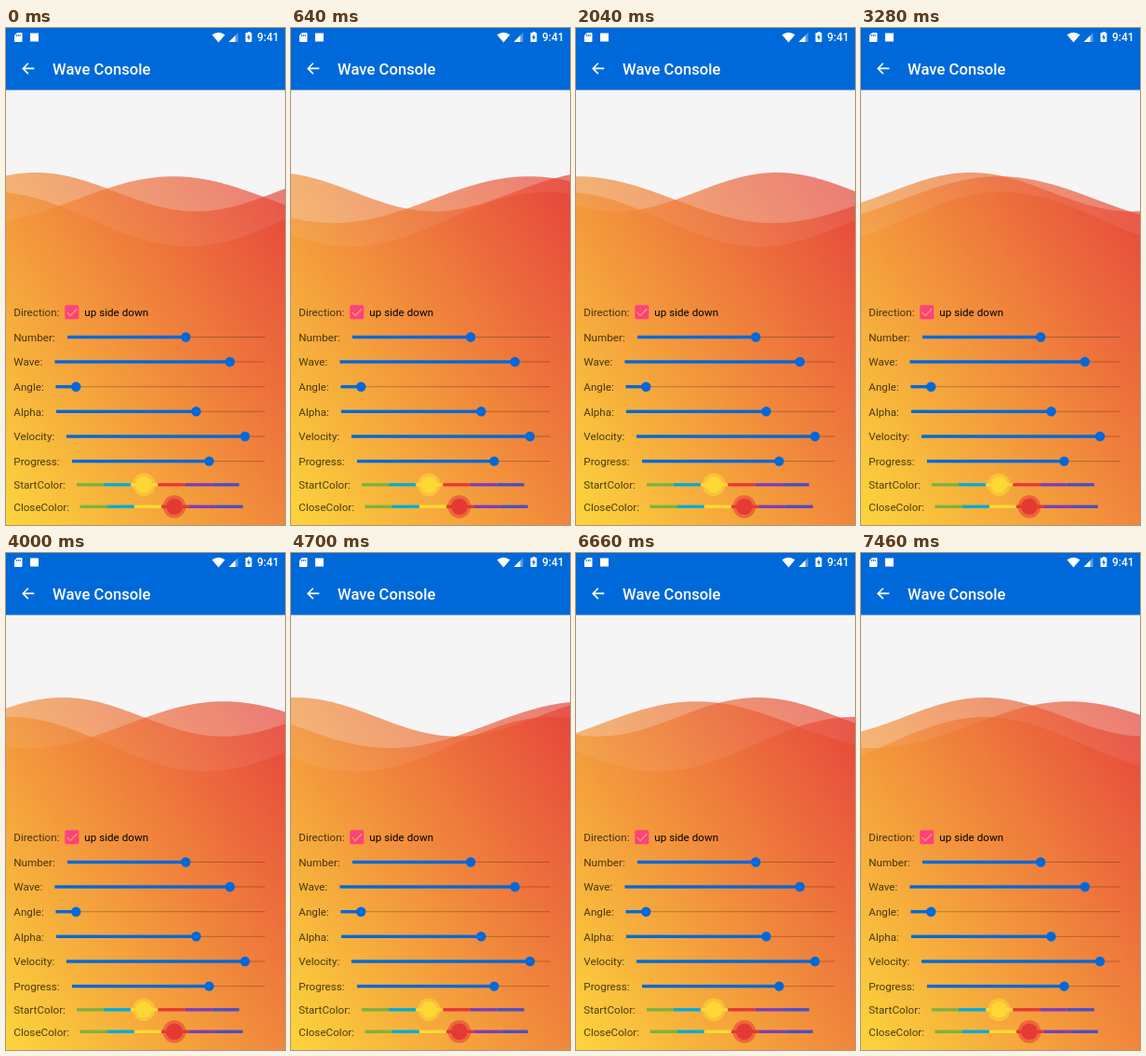
An HTML page with a canvas that plays this animation: 300x533 px, repeating every 7480 ms.

```html
<!DOCTYPE html>
<html lang="en">
<head>
<meta charset="utf-8">
<title>Wave Console</title>
<style>
  html, body { margin: 0; width: 100%; height: 100%; overflow: hidden; background: #f5f5f5; }
  canvas, svg { position: absolute; left: 0; top: 0; width: 300px; height: 533px; display: block; }
  text { font-family: Roboto, "Noto Sans", sans-serif; font-size: 11.67px; }
  .label { fill: rgba(0, 0, 0, .7); }
  .white { fill: #fff; font-weight: 500; }
</style>
</head>
<body>
<canvas id="waves"></canvas>
<svg id="ui" viewBox="0 0 300 533">
  <rect width="300" height="66.5" fill="#0069d9"/>

  <!-- status bar -->
  <path d="M12 5h4.6q.9 0 .9.9v8.2q0 .9-.9.9H9.9q-.9 0-.9-.9V8z" fill="#fff"/>
  <path d="M11.6 7v2M13.4 7v2M15.2 7v2" stroke="#0069d9" stroke-width=".9"/>
  <rect x="26" y="5.5" width="9" height="9" fill="#fff"/>
  <path d="M221.5 7.2q7-5 14 0L228.500 15.500z" fill="#fff"/>
  <path d="M249.500 5v10h-10z" fill="#fff" opacity=".35"/>
  <path d="M246.500 8v7h-7z" fill="#fff"/>
  <path d="M259 5h1V4h2.500v1h1q.8 0 .8.8v8.400q0 .8-.8.800h-5.200q-.8 0-.8-.8V5.800q0-.8.8-.8z" fill="#fff"/>
  <path d="M261.300 6.500L259 10.500h1.600v3l2.400-4.200h-1.700z" fill="#0069d9"/>
  <text class="white" x="270" y="14.300" style="font-size:12px">9:41</text>

  <!-- toolbar -->
  <path d="M30.300 43.400H18.500M23.900 37.700L18.200 43.400L23.900 49.100" fill="none" stroke="#fff" stroke-width="1.600"/>
  <text class="white" x="50" y="49.700" style="font-size:16.67px">Wave Console</text>

  <!-- direction -->
  <text class="label" x="8.300" y="309.300">Direction:</text>
  <rect x="63.300" y="297.300" width="15" height="15" rx="1.700" fill="#ff4081"/>
  <path d="M65.700 305l3.500 3.500l7-7.200" fill="none" stroke="#f5a050" stroke-width="1.500"/>
  <text x="84.300" y="309.300">up side down</text>
</svg>
<script>
const W = 300, H = 533, LOOP = 7480, STEP = 20;
const BLUE = '#0069d9', YELLOW = '#fdd835', RED = '#e53935';

// ---- controls ----
const ui = document.getElementById('ui');

function add(tag, attrs, text) {
  const el = document.createElementNS('http://www.w3.org/2000/svg', tag);
  for (const key in attrs) el.setAttribute(key, attrs[key]);
  if (text) el.textContent = text;
  ui.appendChild(el);
}

const label = (text, y) => add('text', { class: 'label', x: 8.3, y: y + 4.4 }, text);
const bar = (x, end, y, h, fill) => add('rect', { x, y: y - h / 2, width: end - x, height: h, fill });
const dot = (cx, cy, r, fill, opacity = 1) => add('circle', { cx, cy, r, fill, opacity });

function slider(text, y, start, thumb) {
  label(text, y);
  bar(start, 278.5, y, 1, 'rgba(0,0,0,.26)');
  bar(start, thumb, y, 3.4, BLUE);
  dot(thumb, y, 5.2, BLUE);
}

function colorSlider(text, y, start, end, thumb, color) {
  label(text, y);
  const colors = ['#7cb342', '#00acd6', YELLOW, RED, '#7b3fb5', '#4a4fc4'];
  const w = (end - start) / colors.length;
  colors.forEach((c, i) => bar(start + i * w, start + (i + 1) * w, y, 3.4, c));
  dot(thumb, y, 12.3, color, .55);
  dot(thumb, y, 8.8, color);
}

slider('Number:', 331.5, 66, 193.3);
slider('Wave:', 358, 52.5, 240.8);
slider('Angle:', 384.7, 53.5, 75.3);
slider('Alpha:', 411.3, 54, 204.5);
slider('Velocity:', 438, 65, 257);
slider('Progress:', 464.6, 71, 218.5);
colorSlider('StartColor:', 489.8, 76, 250.7, 148.3, YELLOW);
colorSlider('CloseColor:', 513.3, 79.5, 254.7, 181, RED);

// ---- waves ----
const canvas = document.getElementById('waves');
const ctx = canvas.getContext('2d');
const dpr = window.devicePixelRatio || 1;
canvas.width = W * dpr;
canvas.height = H * dpr;
ctx.scale(dpr, dpr);

const DP = 300 / 360, TOP = 155, ALPHA = .67;
const SPEED = 7.9; // px per second for one unit of velocity
const waves = [
  { crest: -14, drop: 25, sx: 1.4, sy: 1.4, v: -26 },
  { crest: 180, drop: 5, sx: 1.4, sy: 1.2, v: 15 },
  { crest: 32, drop: 0, sx: 1.15, sy: 1, v: -10 }
];

function makeGradient(degrees) {
  const h = H - TOP, r = Math.hypot(W, h) / 2, a = degrees * Math.PI / 180;
  const dx = r * Math.cos(a), dy = r * Math.sin(a);
  const cx = W / 2, cy = TOP + h / 2;
  const g = ctx.createLinearGradient(cx - dx, cy + dy, cx + dx, cy - dy);
  g.addColorStop(0, YELLOW);
  g.addColorStop(1, RED);
  return g;
}
const gradient = makeGradient(33.8);

function drawWave(wave, sec) {
  const amp = 25 * DP * wave.sy;
  const mid = TOP + wave.drop * DP + amp;
  const crest = wave.crest + wave.v * SPEED * sec;
  const k = 2 * Math.PI / (W * wave.sx);
  ctx.beginPath();
  ctx.moveTo(0, H);
  for (let x = 0; x <= W; x++) ctx.lineTo(x, mid - amp * Math.cos(k * (x - crest)));
  ctx.lineTo(W, H);
  ctx.fill();
}

function draw(ms) {
  ctx.globalAlpha = 1;
  ctx.fillStyle = '#f5f5f5';
  ctx.fillRect(0, 0, W, H);
  ctx.globalAlpha = ALPHA;
  ctx.fillStyle = gradient;
  waves.forEach(wave => drawWave(wave, ms / 1000));
}

const begin = performance.now();
function tick() {
  const t = (performance.now() - begin) % LOOP;
  draw(Math.floor(t / STEP) * STEP);
  requestAnimationFrame(tick);
}
draw(0);
requestAnimationFrame(tick);
</script>
</body>
</html>
```
